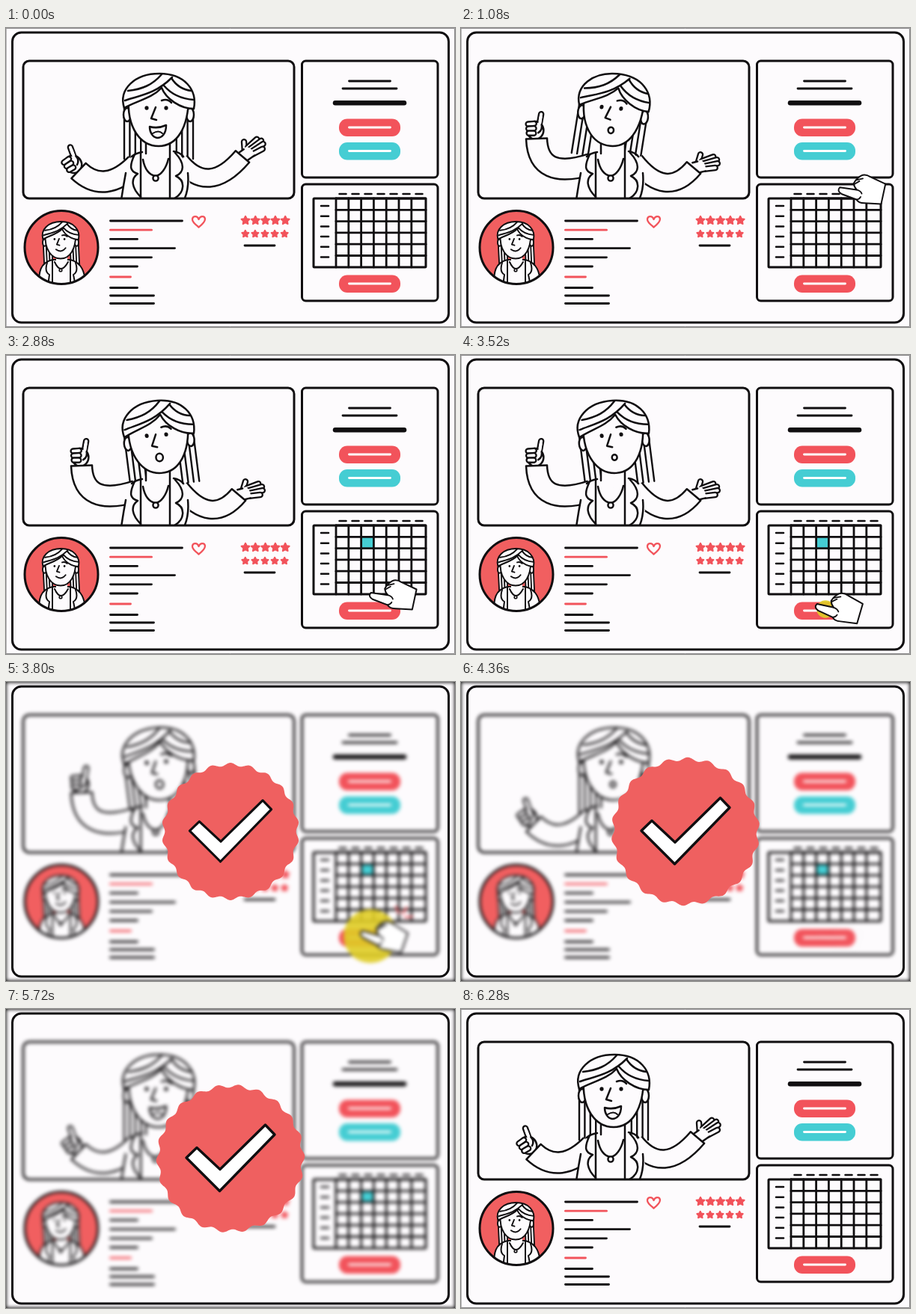
Recreate the animation shown at these times as an HTML page with a canvas. Size 600 by 400 pixels, loop 6.32 s.

```html
<!DOCTYPE html>
<html lang="en">
<head>
<meta charset="utf-8">
<title>Online class booking</title>
<style>
html, body { margin: 0; width: 100%; height: 100%; overflow: hidden; background: #fdfbfd; }
canvas { display: block; width: 600px; height: 400px; }
</style>
</head>
<body>
<canvas id="stage" width="600" height="400"></canvas>
<script>
const LOOP = 6320;
const INK = '#100e10', PAPER = '#fdfbfd', RED = '#f2535b', TEAL = '#45cdd3', YELLOW = '#dfcc25';
const view = document.getElementById('stage').getContext('2d');
const layer = document.createElement('canvas');
layer.width = 600;
layer.height = 400;
const sheet = layer.getContext('2d');
let c = sheet;

const clamp = x => Math.max(0, Math.min(1, x));
const lerp = (a, b, u) => a + (b - a) * u;
const mix = (p, q, u) => p.map((v, i) => lerp(v, q[i], u));
const span = (t, a, b) => clamp((t - a) / (b - a));
const smooth = u => u * u * (3 - 2 * u);
const ease = (t, a, b) => smooth(span(t, a, b));
const outQuad = u => 1 - (1 - u) ** 2;
const outCubic = u => 1 - (1 - u) ** 3;
const outBack = u => 1 + 2.7 * (u - 1) ** 3 + 1.7 * (u - 1) ** 2;

function bezier(p, u) {
  while (p.length > 1) p = p.slice(1).map((q, i) => mix(p[i], q, u));
  return p[0];
}

function pen(d, fill, stroke, w = 2.5) {
  const path = typeof d === 'string' ? new Path2D(d) : d;
  if (fill) { c.fillStyle = fill; c.fill(path); }
  if (stroke) { c.strokeStyle = stroke; c.lineWidth = w; c.stroke(path); }
}

const ink = (d, w) => pen(d, null, INK, w);

function line(x1, y1, x2, y2, color = INK, w = 2.8) {
  pen(`M${x1} ${y1}L${x2} ${y2}`, null, color, w);
}

function box(x, y, x2, y2, r, fill, stroke, w = 3) {
  const p = new Path2D();
  p.roundRect(x, y, x2 - x, y2 - y, r);
  pen(p, fill, stroke, w);
}

function oval(x, y, rx, ry, fill, stroke, w) {
  const p = new Path2D();
  p.ellipse(x, y, rx, ry, 0, 0, 7);
  pen(p, fill, stroke, w);
}

// A ring of n points whose radius is given by a function of the angle.
function ring(n, radius) {
  const p = new Path2D();
  for (let i = 0; i < n; i++) {
    const a = (i / n * 2 - .5) * Math.PI, r = radius(a, i);
    p.lineTo(r * Math.cos(a), r * Math.sin(a));
  }
  p.closePath();
  return p;
}

function at(x, y, deg, draw, scale = 1) {
  c.save();
  c.translate(x, y);
  c.rotate(deg * Math.PI / 180);
  c.scale(scale, scale);
  draw();
  c.restore();
}

// Head parts are drawn around the middle of the face.
function strands(tilt, w) {
  at(0, 0, tilt * 1.8, () => {
    for (const side of [-1, 1]) {
      c.fillStyle = PAPER;
      c.fillRect(side < 0 ? -45 : 23, -8, 23, 80);
      for (let i = 0; i < 4; i++) line(side * (46 - i * 7.4), -6, side * (46 - i * 7.4), 69, INK, w);
    }
  });
}

function head(tilt, mouth, size, w = 2.5) {
  at(0, 0, tilt, () => {
    for (const side of [-1, 1]) oval(side * 42, 10, 5, 9, PAPER, INK, w);
    pen('M-40 -14C-43 28 -24 52 0 52C24 52 40 28 40 -14L4 -32Z', PAPER);
    ink('M-40 -14C-43 28 -24 52 0 52C24 52 40 28 40 -14', w);
    pen('M-46 1C-54 -24 -32 -45 1 -45C34 -45 52 -24 47 2C29 2 10 -11 4 -26C-9 -12 -28 -9 -46 1Z', PAPER, INK, w);
    ink('M-45 -9C-24 -16 -4 -18 18 -40M-41 -22C-22 -24 -8 -30 4 -44M7 -29C18 -16 32 -11 47 -10M17 -39C24 -28 34 -23 44 -22', w);
    for (const x of [-16, 10]) oval(x, 1, 2.6, 2.8, INK);
    ink('M4 -9Q12 -12 17 -6M-4 0L-10 15L-3 17', w);
    if (mouth === 'smile') {
      pen('M-12 26Q-1 29 10 24C10 36 4 41 -2 41C-8 40 -12 34 -12 26Z', PAPER, INK, w);
      ink('M-8 35Q0 30 5 35', 2);
    } else if (mouth === 'grin') {
      ink('M-12 28Q2 38 13 24', w);
    } else {
      oval(-1, 31, size * .9, size, PAPER, INK, w);
    }
  });
}

function sleeve(wrist, elbow, shoulder, w) {
  const d = `M${wrist}Q${elbow} ${shoulder}`;
  const len = Math.hypot(elbow[0] - wrist[0], elbow[1] - wrist[1]);
  const nx = (wrist[1] - elbow[1]) / len * w / 2, ny = (elbow[0] - wrist[0]) / len * w / 2;
  c.lineCap = 'butt';
  ink(d, w + 2.5);
  pen(d, null, PAPER, w - 2.5);
  c.lineCap = 'round';
  line(wrist[0] - nx, wrist[1] - ny, wrist[0] + nx, wrist[1] + ny, INK, 2.5);
}

function finger(x1, y1, x2, y2, w = 8.5) {
  line(x1, y1, x2, y2, INK, w);
  line(x1, y1, x2, y2, PAPER, w - 4.6);
}

function pointHand() {
  finger(2, -12, 5, -33);
  oval(-2, -11, 11, 12, PAPER, INK, 2.5);
  line(2.5, -12, 4.6, -29, PAPER, 4);
  for (let i = 0; i < 3; i++) finger(-12 + i * .7, -19 + i * 6, -4, -20 + i * 6.4);
  ink('M2 -8Q8 -12 6 -19');
}

function openHand() {
  finger(7, -5, 13, -15);
  for (let i = 0; i < 4; i++) finger(13, -6 + i * 3.7, 33 - (i - 1.4) ** 2 * 2, -8 + i * 5);
  pen('M0 -7L12 -8Q18 0 14 8L0 8Z', PAPER);
  ink('M0 -7L7 -7M0 8L14 8');
}

function ray(x, y, deg, near, far, p) {
  if (p <= 0 || p >= 1) return;
  at(x, y, deg, () => line(lerp(near, far - 1, clamp(p * 2 - 1.1)), 0, lerp(near, far, clamp(p * 2)), 0, RED, 2.2));
}

function teacher(t) {
  const swing = ease(t, 200, 580) - ease(t, 3960, 4400);
  const tilt = 5 * ease(t, 400, 820) - 9 * ease(t, 2100, 2540) + 4 * ease(t, 3900, 4400);
  const smile = t < 380 || (t > 1480 && t < 2240) || t > 5500;
  const size = 4.4 + 1.1 * Math.cos((t - 3800) / 413 * Math.PI);
  const left = mix([97, 191], [101, 148], swing), right = mix([316, 172], [311, 187], swing);
  c.save();
  c.beginPath();
  c.rect(23, 44, 362, 184);
  c.clip();
  at(204, 106, 0, () => strands(tilt, 2.4));
  at(...left, lerp(-28, 2, swing), pointHand);
  at(...right, lerp(-35, -14, swing), openHand);
  sleeve(left, mix([132, 224], [103, 205], swing), [174, 182], 28);
  sleeve(right, mix([270, 226], [274, 231], swing), [232, 178], 24);
  pen('M182 166C168 167 160 180 160 194L154 230H240L246 208L243 194C241 178 234 168 224 165Z', PAPER);
  ink('M182 166C176 167 171 169 168 172M224 165C230 166 234 168 237 172M160 194Q157 210 154 230M243 194Q245 214 238 230');
  pen('M187 150V172Q203 186 218 168V150Z', PAPER);
  ink('M187 154V168M219 153V166M180 167V230M219 166V230');
  ink('M172 169C164 186 166 192 176 195C166 202 168 214 180 226M226 167C240 182 238 193 227 198C240 204 239 220 225 228');
  ink('M183 176C186 192 194 197 200 198C207 197 214 188 217 175');
  oval(200, 201, 3.6, 3.6, PAPER, INK, 2.4);
  at(204, 106, 0, () => head(tilt, smile ? 'smile' : 'o', size));
  c.restore();
  for (let i = 0; i < 3; i++) ray(251, 100, -64 + i * 28, 13, 30, (t - 1503 - i * 126) / 300);
}

function avatar() {
  oval(74, 293.5, 49, 49, '#f15f60');
  c.save();
  c.beginPath();
  c.arc(74, 293.5, 49, 0, 7);
  c.clip();
  at(73, 282, 0, () => strands(-1.5, 3.6), .51);
  pen('M44 350C43 325 46 314 62 310H86C101 314 106 325 107 350Z', PAPER, INK, 2);
  pen('M67 303V312Q74 320 82 312V303Z', PAPER);
  ink('M62 310V345M86 310V345M55 314Q51 326 58 330L56 345M93 314Q97 326 90 330L93 345M65 313Q73 331 83 313', 2);
  oval(73, 324, 1.8, 1.8, PAPER, INK, 1.6);
  at(73, 282, 0, () => head(0, 'grin', 4, 3.8), .51);
  c.restore();
  oval(74, 293.5, 49, 49, null, INK, 3);
}

function star(x, y, r) {
  at(x, y, 0, () => pen(ring(10, (a, i) => i % 2 ? r * .5 : r), RED, RED, 2));
}

function rows(y, step, widths, accent) {
  widths.forEach((w, i) => line(139.5, y + i * step, 139.5 + w, y + i * step, i === accent ? RED : INK));
}

function profile() {
  avatar();
  rows(258, 12.2, [96, 55, 36, 86, 55, 36], 1);
  rows(333, 0, [27], 0);
  rows(347.5, 10.5, [36, 58, 58]);
  pen('M257.5 266.5C252 262 248.5 259 249 255.5C250 251 256 251 257.5 256C259.5 251 265.5 251 266 255.5C266 259 262 263 257.5 266.5Z', null, RED, 2.3);
  for (let i = 0; i < 5; i++) {
    star(320 + i * 13.3, 257.5, 5.7);
    star(319.8 + i * 13.1, 275.5, 4.7);
  }
  line(319, 291, 359, 291);
}

function pill(y, color) {
  box(445, y, 527, y + 23.5, 11, color);
  line(458.5, y + 11.5, 513.5, y + 11.5, '#fff');
}

function disc(t, x, y, on, off) {
  const r = 36 * outCubic(span(t, on, on + 330)) * (1 - ease(t, off, off + 200));
  c.globalAlpha = .9;
  oval(x, y, r, r, YELLOW);
  c.globalAlpha = 1;
}

function calendar(t) {
  disc(t, 492, 256, 1680, 2220);
  c.globalAlpha = ease(t, 2100, 2240) - ease(t, 5880, 6160);
  box(475, 244, 491.5, 259, 0, TEAL);
  c.globalAlpha = 1;
  for (let i = 0; i < 7; i++) {
    const x = 441 + i * 16.8, mark = 445.5 + i * 17;
    line(x, 228, x, 320);
    line(mark, 222, mark + 9, 222, INK, 2.5);
  }
  for (let i = 0; i < 6; i++) {
    const y = 228 + i * 15.3, mark = 238 + i * 13.7;
    line(441, y, 561, y);
    line(421, mark, 431, mark, INK, 2.5);
  }
  box(411, 228, 561, 320, 1, null, INK);
}

function cursor(t) {
  if (t < 700 || t > 4400) return;
  const cell = [481, 251], button = [474, 337];
  const [x, y] = t < 2600
    ? bezier([[610, 190], [548, 143], cell], outQuad(span(t, 700, 1360)))
    : bezier([cell, [640, 260], [482, 306], button], outCubic(span(t, 2600, 3200)));
  const press = ease(t, 1500, 1680) - ease(t, 2350, 2560) + ease(t, 3420, 3600);
  c.globalAlpha = 1 - ease(t, 4120, 4380);
  at(x, y, lerp(-7, 0, press), () => {
    pen('M2 -4Q-3 0 3 5L22 15Q24 20 32 21L54 25L63 -1L44 -13Q38 -18 32 -16Q25 -13 21 -7Q21 -2 24 2Z', '#fff', INK, 2);
    ink('M22 -6L29 -9M25 -11L34 -12M24 2Q29 4 30 8M22 15Q26 15 28 12', 1.8);
  });
  c.globalAlpha = 1;
  for (let i = 0; i < 3; i++) {
    const a = -112 + i * 54;
    ray(cell[0] + 53, cell[1] - 22, a, 6, 17, (t - 1760) / 330);
    ray(button[0] + 53, button[1] - 22, a, 6, 17, (t - 3650) / 330);
  }
}

function scene(t) {
  c.fillStyle = PAPER;
  c.fillRect(0, 0, 600, 400);
  c.lineCap = c.lineJoin = 'round';
  box(.5, .5, 599.5, 399.5, 0, null, '#8a888a', 1);
  teacher(t);
  box(23, 44, 385, 228, 8, null, INK);
  box(395.5, 44, 577, 200, 5, null, INK);
  box(395.5, 209, 577, 365, 5, null, INK);
  line(458.5, 71, 513.5, 71);
  line(450, 81, 522, 81);
  line(440, 100.2, 532, 100.2, INK, 6.5);
  pill(121.5, RED);
  pill(153, TEAL);
  profile();
  calendar(t);
  pill(330.5, RED);
  disc(t, 487, 340, 3480, 4050);
  cursor(t);
}

function badge(t) {
  const s = outBack(span(t, 3640, 4156)) * (1 - ease(t, 5840, 6120));
  if (s < .01) return;
  const turn = (t - 3800) / 17000;
  at(300, 200, 0, () => {
    pen(ring(360, a => 97 + 2.3 * Math.cos(22 * (a + Math.PI / 2 - turn))), '#ef6060');
    pen('M-59 -1L-45 -14.5L-14 14.5L46.5 -45L59 -32L-14.5 43.5Z', '#fff', INK, 3.4);
  }, s);
}

function frame() {
  const t = performance.now() % LOOP;
  c = sheet;
  scene(t);
  c = view;
  const blur = 2.7 * (ease(t, 3400, 3760) - ease(t, 5840, 6160));
  c.fillStyle = '#000';
  c.fillRect(0, 0, 600, 400);
  c.filter = blur > .02 ? `blur(${blur}px)` : 'none';
  c.drawImage(layer, 0, 0);
  c.filter = 'none';
  c.lineCap = c.lineJoin = 'round';
  box(8.5, 6, 591.5, 394, 12, null, INK);
  badge(t);
  requestAnimationFrame(frame);
}
frame();
</script>
</body>
</html>
```
